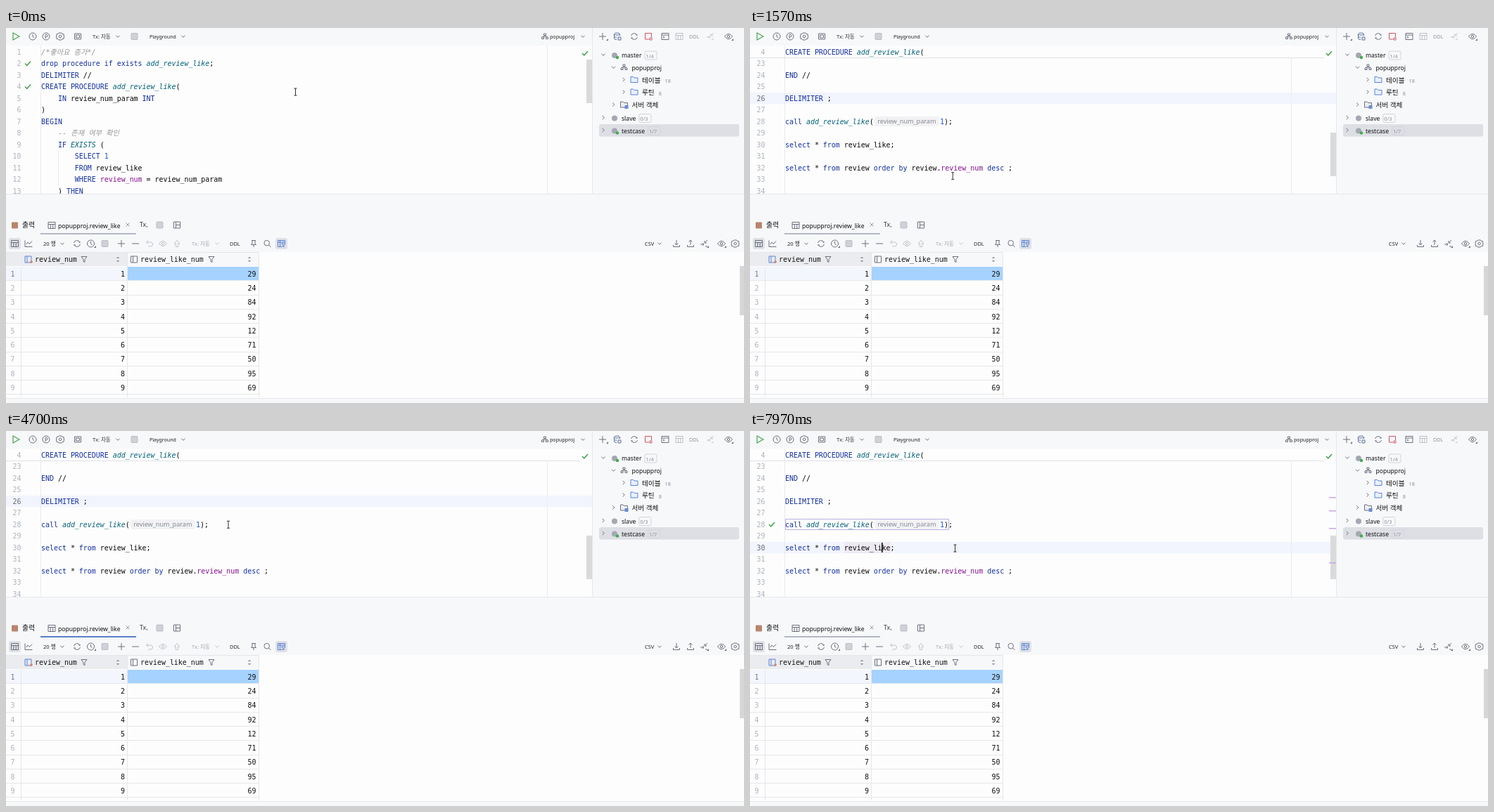
An HTML page with a canvas for the animation above (8 s loop, 1049x534 px).

```html
<!DOCTYPE html>
<html lang="ko">
<head>
<meta charset="utf-8">
<style>
html, body { margin: 0; width: 100%; height: 100%; overflow: hidden; background: #fdfdfd; }
canvas { display: block; }
</style>
</head>
<body>
<canvas id="stage" width="1049" height="534"></canvas>
<script>
const c = document.getElementById('stage').getContext('2d');
const LOOP = 8000, PITCH = 16.5;
const CODE = '9.95px "DejaVu Sans Mono", "Noto Sans CJK KR", monospace';
const NOTE = 'italic 10.2px "DejaVu Sans Mono", "Noto Sans CJK KR", monospace';
const ui = size => size + 'px "Noto Sans", "Noto Sans CJK KR", sans-serif';
const PAPER = '#fdfdfd', PANEL = '#f7f8fa', EDGE = '#e6e7ec', INK = '#6c707e', PALE = '#bfc2cb', DARK = '#111';
const BLUE = '#5b83d6', GREEN = '#4aa653';

// Times of the user's actions
const PANEL_FOCUS = 3000, CLICK_CALL = 4800, POPUP = 5400, RUN = 5900, DONE = 6100, CLICK_SELECT = 6950;

const source = `/*좋아요 증가*/
drop procedure if exists add_review_like;
DELIMITER //
CREATE PROCEDURE add_review_like(
    IN review_num_param INT
)
BEGIN
    -- 존재 여부 확인
    IF EXISTS (
        SELECT 1
        FROM review_like
        WHERE review_num = review_num_param
    ) THEN
        -- 리뷰 번호가 존재하면 좋아요 증가
        UPDATE review_like
        SET review_like_num = review_like_num + 1
        WHERE review_num = review_num_param;
    ELSE
        -- 리뷰 번호가 없으면 새로 추가
        INSERT INTO review_like (review_num, review_like_num)
        VALUES ({review_num}review_num_param, {review_like_num}1);
    END IF;

END //

DELIMITER ;

call add_review_like({review_num_param}1);

select * from review_like;

select * from review order by review.review_num desc ;

`.split('\n');
const keywords = new Set(('drop procedure if exists delimiter create in int begin select from where then update set ' +
  'else insert into values end call order by desc').split(' '));

const icons = {
  play: 'M-4-5L5 0L-4 5Z',
  clock: 'M5 0A5 5 0 1 1-5 0A5 5 0 1 1 5 0M0-3V0L2 2',
  param: 'M5 0A5 5 0 1 1-5 0A5 5 0 1 1 5 0M-1 3V-2.5H.5A1.6 1.6 0 0 1 .5 .8H-1',
  gear: 'M-2-5H2L3-3.5H5L5.5 0L5 3.5H3L2 5H-2L-3 3.5H-5L-5.5 0L-5-3.5H-3ZM1.8 0A1.8 1.8 0 1 1-1.8 0A1.8 1.8 0 1 1 1.8 0',
  frame: 'M-4.5-4H4.5V4H-4.5ZM-2.5-2H2.5V2H-2.5Z',
  layout: 'M-4.5-4.5H4.5V4.5H-4.5ZM-1.5-4.5V4.5M-1.5 0H4.5',
  table: 'M-5-4.5H5V4.5H-5ZM-5-1.5H5M-1.7-1.5V4.5M1.7-1.5V4.5',
  down: 'M-2.6-1.3L0 1.3L2.6-1.3',
  right: 'M-1.3-2.6L1.3 0L-1.3 2.6',
  schema: 'M-1.5-4H1.5V-1.5H-1.5ZM-4.5 1H-1.5V3.5H-4.5ZM1.5 1H4.5V3.5H1.5ZM0-1.5V0M-3 1V0H3V1',
  plus: 'M-5 0H5M0-5V5',
  minus: 'M-5 0H5',
  cross: 'M-2.5-2.5L2.5 2.5M2.5-2.5L-2.5 2.5',
  data: 'M-4.5-3.5A4 1.5 0 1 1 3.5-3.5A4 1.5 0 1 1-4.5-3.5V3A4 1.5 0 0 0-1 4.5M3.5-3.5V-1M-4.5 0A4 1.5 0 0 0-1 1.3M1 1H5V5H1Z',
  refresh: 'M-4.5-1A4.6 4.6 0 0 1 4-2M4.5 1A4.6 4.6 0 0 1-4 2M2-2H5M-5 2H-2',
  stop: 'M1 4H-4.5V-4.5H4.5V1M2 2H5V5H2Z',
  console: 'M-5-4.5H5V4.5H-5ZM-5-2H5M-3 0L-1 1.2L-3 2.5',
  import: 'M5-5L1-1M1-4V-1H4M-5 1H0M-2-1L0 1L-2 3M2 4H5',
  eye: 'M-5.5 0Q0-7.5 5.5 0Q0 7.5-5.5 0M1.7 0A1.7 1.7 0 1 1-1.7 0A1.7 1.7 0 1 1 1.7 0',
  chart: 'M-5-4.5V4.5H5.5M-3 1L-1-2L1.5 .5L5-3.5',
  undo: 'M-2-4.5L-4.5-2L-2 .5M-4.5-2H1.5A3 3 0 0 1 1.5 4H-2',
  up: 'M0-4.5L-4 0H-1.7V4.5H1.7V0H4Z',
  pin: 'M-3-4.5H3M-2-4.5V0L-3.5 1.5H3.5L2 0V-4.5M0 1.5V5',
  search: 'M3-.8A3.8 3.8 0 1 1-4.6-.8A3.8 3.8 0 1 1 3-.8M2 2L5 5',
  filter: 'M-4-4H4L1 0V4L-1 3V0Z',
  gridFilter: 'M1 4.5H-5V-4.5H5V-1M-5-2H5M-2-4.5V4.5M0 0H5.5L3.5 2.5V5L2 4V2.5Z',
  save: 'M-4.5 2V4.5H4.5V2M0-5V2M-2.5-.5L0 2L2.5-.5',
  load: 'M-4.5 2V4.5H4.5V2M0 2V-5M-2.5-2.5L0-5L2.5-2.5',
  folder: 'M-5-4H-1.5L0-2.5H5V4H-5Z',
  column: 'M-4.5-4.5H4.5V4.5H-4.5ZM-1.5-4.5V4.5',
  sort: 'M-1.5-1.5L0-3L1.5-1.5M-1.5 1.5L0 3L1.5 1.5',
  check: 'M-4 0L-1.2 2.8L4-3',
  target: 'M5 0A5 5 0 1 1-5 0A5 5 0 1 1 5 0M0-5V-2M0 5V2M-5 0H-2M5 0H2',
  ibeam: 'M-2-5H2M0-5V5M-2 5H2',
  arrow: 'M0 0V10L2.4 8L4 11.5L5.6 10.7L4 7.4H7Z',
};

function icon(name, x, y, color = INK, width = 1, fill) {
  const path = new Path2D(icons[name]);
  c.save();
  c.translate(x, y);
  if (fill) { c.fillStyle = fill; c.fill(path); }
  c.strokeStyle = color;
  c.lineWidth = width;
  c.stroke(path);
  c.restore();
}
function rect(x, y, w, h, color) {
  c.fillStyle = color;
  c.fillRect(x, y, w, h);
}
function round(x, y, w, h, r, fill, stroke) {
  c.beginPath();
  c.roundRect(x, y, w, h, r);
  if (fill) { c.fillStyle = fill; c.fill(); }
  if (stroke) { c.strokeStyle = stroke; c.lineWidth = 1; c.stroke(); }
}
function disc(x, y, r, color) {
  round(x - r, y - r, 2 * r, 2 * r, r, color);
}
// Draws text centred on y and returns its width
function text(str, x, y, font = ui(8.6), color = DARK, align = 'left') {
  c.font = font;
  c.fillStyle = color;
  c.textAlign = align;
  c.fillText(str, x, y + (font.includes('Mono') ? 3.8 : 3.4));
  return c.measureText(str).width;
}
const corner = (x, y) => { c.beginPath(); c.moveTo(x, y); c.lineTo(x, y - 3); c.lineTo(x - 3, y); c.fillStyle = INK; c.fill(); };

// Values at time t along [time, ...values] points; moves in the plane are eased
function follow(points, t) {
  const i = points.findIndex(p => p[0] > t);
  if (i < 0) return points.at(-1).slice(1);
  if (i === 0) return points[0].slice(1);
  const a = points[i - 1], b = points[i];
  let k = (t - a[0]) / (b[0] - a[0]);
  if (a.length > 2) k = k * k * (3 - 2 * k);
  return a.slice(1).map((v, n) => v + (b[n + 1] - v) * k);
}
const scrollPath = [[130, 0], [250, 30], [370, 71.2], [770, 295.5], [860, 338], [930, 346.5]];
const pointerPath = [[700, 411, 91], [770, 411, 93.5], [1150, 411, 93.5], [2050, 138, 353], [2500, 138, 353],
  [3600, 290, 251], [4150, 290, 251], [4750, 316, 131], [6300, 316, 131], [6900, 188, 167], [7050, 188, 167], [7600, 291, 167]];

function codeLine(n, y) {
  let x = 50;
  for (const [tok, note, hint, num, word] of source[n - 1].matchAll(/(\/\*.*|--.*)|\{(\w+)\}|(\d+)|(\w+)|[^\w{]/g)) {
    if (hint) {
      const font = ui(9.1);
      c.font = font;
      const w = c.measureText(hint).width;
      round(x + 1.5, y - 7, w + 8, 14, 3, '#f2f2f4');
      text(hint, x + 5.5, y - .5, font, '#868a94');
      x += w + 11;
      continue;
    }
    let color = '#080808', font = CODE;
    if (note) [color, font] = ['#969696', NOTE];
    else if (num) color = '#1750eb';
    else if (word === 'add_review_like' || word === 'EXISTS') [color, font] = ['#00627a', 'italic ' + CODE];
    else if (word === 'review_num' || word === 'review_like_num') color = '#871094';
    else if (word && keywords.has(word.toLowerCase())) color = '#12309c';
    x += text(tok, x, y, font, color);
  }
}
const lineNumber = (n, y, active) => text(n, 21.5, y, CODE, active ? '#686c7c' : '#aeb3c2', 'right');

function editor(t) {
  const [scroll] = follow(scrollPath, t);
  const yOf = n => 34 + PITCH * (n - 1) - scroll;
  const current = t < CLICK_CALL ? 26 : t < CLICK_SELECT ? 28 : 30;
  c.save();
  c.beginPath();
  c.rect(0, 25, 833, 211);
  c.clip();
  rect(0, 25, 833, 211, PAPER);
  rect(0, yOf(current) - 8.2, 833, PITCH, '#f2f5fd');
  rect(49, 25, 1, 211, '#e9eaee');
  rect(769, 25, 1, 211, '#ececef');
  for (const [first, count] of [[10, 3], [14, 4], [19, 3]]) rect(74, yOf(first) - 8, 1, PITCH * count, '#e4e5e9');

  const callY = yOf(28);
  if (t >= POPUP && t < RUN) {
    rect(50, callY - 8, 233, 16, '#c9c6f4');
    rect(175, callY - 8, 6, 16, '#9bdcdc');
    rect(277, callY - 8, 6, 16, '#9bdcdc');
  }
  if (t >= RUN) round(50.5, callY - 7.5, 232, 15, 0, null, '#b9b0e4');
  if (t >= CLICK_SELECT) rect(134, yOf(30) - 8, 66, 16, '#eeeaf4');

  source.forEach((_, i) => {
    const n = i + 1, y = yOf(n);
    if (y < 15 || y > 248) return;
    lineNumber(n, y, n === current);
    codeLine(n, y);
    if (n === 2 || n === 4 || (n === 28 && t >= DONE)) icon('check', 31, y, GREEN, 1.6);
  });

  const blinkOn = start => Math.floor((t - start) / 500) % 2 === 0;
  if (t >= CLICK_SELECT) { if (blinkOn(CLICK_SELECT)) rect(187, yOf(30) - 7, 1.5, 14, '#000'); }
  else if (t >= CLICK_CALL && blinkOn(CLICK_CALL)) rect(288, callY - 7, 1.5, 14, '#000');

  if (scroll > 49.5) {
    rect(0, 25, 816, 17, PAPER);
    rect(0, 42, 816, 1, '#dfe1e6');
    rect(49, 25, 1, 17, '#e9eaee');
    lineNumber(4, 34);
    codeLine(4, 34);
  }
  rect(825, 45 + scroll * .3, 8, 62, '#dadada');
  if (t >= CLICK_SELECT) for (const y of [94, 113, 138, 187]) rect(823, y, 10, 1.5, '#c9a4ec');
  else if (t >= CLICK_CALL) rect(823, 177, 10, 1.5, '#8286a8');
  icon('check', 823, 36, GREEN, 1.6);
  c.restore();
}

function topBar() {
  const y = 12;
  icon('play', 14, y, GREEN, 1.2);
  icon('clock', 38, y);
  icon('param', 57, y);
  icon('gear', 77, y);
  icon('frame', 102, y);
  text('Tx: 자동', 123, y, ui(7.5), '#333');
  icon('down', 159, y);
  round(178, 7.5, 9, 9, 1, '#cfd1d7', '#bcbec6');
  text('Playground', 204, y, ui(7), '#222');
  icon('down', 252, y);
  icon('schema', 766, y);
  text('popupproj', 773, y, ui(7.1), '#222');
  icon('down', 820, y);
  icon('plus', 848, y);
  corner(856, 18);
  icon('data', 869, y, '#59709f');
  icon('refresh', 893, y);
  icon('stop', 913, y, '#cc5560');
  icon('console', 937, y);
  icon('table', 957, y, PALE);
  text('DDL', 971, y, ui(7.2), '#8d919c');
  icon('import', 1001, y, PALE);
  icon('eye', 1027, y);
  corner(1034, 18);
}

function tree() {
  round(843, 137, 199, 17.5, 3, '#dddfe5');
  const rows = [
    ['master', 0, 39, 'down', '1/4'], ['popupproj', 1, 57, 'down'], ['테이블', 2, 74.5, 'right', '18'],
    ['루틴', 2, 92, 'right', '8'], ['서버 객체', 1, 110, 'right'],
    ['slave', 0, 128.5, 'right', '0/3'], ['testcase', 0, 146.5, 'right', '1/7'],
  ];
  for (const [name, depth, y, chevron, count] of rows) {
    const x = 875 + depth * 14.5;
    icon(chevron, x - 26, y - 1);
    if (!depth) {
      disc(x - 10, y, 4, '#a4a8b2');
      if (name !== 'slave') disc(x - 6, y + 3, 2.2, '#3fae49');
    } else if (name === 'popupproj') icon('schema', x - 11, y - 1);
    else icon('folder', x - 11, y - 1, depth === 1 ? INK : BLUE, 1, depth === 1 ? '#eceef2' : '#e9f0ff');
    if (name === '서버 객체') rect(x - 10, y, 5, 5, '#6a8bd0');
    const size = /[a-z]/.test(name) ? 8.6 : 9.6;
    const end = x + text(name, x, y, ui(size), '#111');
    if (!count) continue;
    if (!depth) round(end + 4.5, y - 6, 17, 12, 2, null, '#d3d5dc');
    text(count, end + 6, y + .5, ui(7.4), '#8c909c');
  }
}

function resultBars(t) {
  if (follow(pointerPath, t)[1] > 237) {
    icon('target', 997, 252);
    for (const dy of [-4, 0, 4]) disc(1016, 252 + dy, .9, INK);
    icon('minus', 1036, 252);
  }
  let y = 281;
  round(8, 276.5, 9, 9, 1, '#b8856d');
  text('출력', 23, y, ui(9.8));
  icon('table', 65, y);
  text('popupproj.review_like', 74, y + .5);
  icon('cross', 173, y - 1, '#9599a5');
  text('Tx,', 190, y - 1, ui(8.6), '#333');
  round(214, 276, 9, 9, 1, '#cfd1d7', '#bcbec6');
  icon('layout', 243, y - .5);
  const focused = t >= PANEL_FOCUS && t < CLICK_CALL;
  rect(49, 292, 136, 2, focused ? '#5b7fc7' : '#b4b8c6');

  y = 307;
  round(4, 299, 17, 16, 3, '#dfe1e6');
  round(383, 299, 17, 16, 3, '#dfe1e6');
  icon('table', 12.5, y);
  icon('chart', 32, y);
  text('20 행', 53, y, ui(7.6), '#222');
  icon('down', 80, y);
  icon('refresh', 101, y);
  icon('clock', 120.5, y);
  corner(128, 313);
  round(136, 302.5, 9, 9, 1, '#cfd1d7', '#bcbec6');
  icon('plus', 164, y);
  icon('minus', 184, y);
  icon('undo', 204, y, PALE);
  icon('eye', 223, y, PALE);
  icon('up', 243, y, PALE);
  text('Tx: 자동', 264, y, ui(7.5), '#a5a8b2');
  icon('down', 300, y, PALE);
  text('DDL', 318, y, ui(7.4), '#222');
  icon('pin', 352, y);
  icon('search', 371.5, y);
  icon('gridFilter', 391.5, y, BLUE);
  text('CSV', 908, y, ui(7.4), '#222');
  icon('down', 929, y);
  icon('save', 953, y);
  icon('load', 973, y);
  icon('import', 992, y);
  corner(999, 313);
  icon('eye', 1017, y);
  corner(1024, 313);
  icon('gear', 1036.5, y);
}

function grid() {
  const likes = [29, 24, 84, 92, 12, 71, 50, 95, 69], step = 20.25, top = 339.5;
  rect(0, 319, 1049, 208, PAPER);
  rect(0, 319, 360, 20, PANEL);
  rect(0, 319, 172, 20, '#ebecef');
  rect(0, 340, 172, 19, '#f3f6fd');
  rect(173, 340, 186, 19, '#a6d2ff');
  for (const x of [172, 359]) rect(x, 319, 1, 207, EDGE);
  rect(21, top, 1, 186, EDGE);
  icon('column', 31.5, 329.5, BLUE);
  disc(36, 333, 1.8, '#d9815a');
  icon('column', 182, 329.5);
  text('review_num', 41, 329.5, CODE);
  text('review_like_num', 191, 329.5, CODE);
  for (const x of [111, 292]) icon('filter', x, 329.5);
  for (const x of [159, 346]) icon('sort', x, 329.5, '#444');
  likes.forEach((value, i) => {
    const y = 350 + i * step;
    rect(0, Math.floor(top + (i + 1) * step), 360, 1, EDGE);
    text(i + 1, 9.5, y, CODE, i ? '#aeb3c2' : '#767a8a', 'center');
    text(i + 1, 169, y, CODE, DARK, 'right');
    text(value, 355.5, y, CODE, DARK, 'right');
  });
  rect(0, 319, 360, 1, EDGE);
  rect(1043, 339, 6, 70, '#d6d6d6');
  rect(0, 527, 1049, 7, PANEL);
  rect(0, 527, 1049, 1, EDGE);
}

function popup() {
  c.save();
  c.shadowColor = 'rgba(0,0,0,.22)';
  c.shadowBlur = 34;
  c.shadowOffsetY = 14;
  round(270.5, 141.5, 252, 84, 6, '#fff');
  c.restore();
  round(270.5, 141.5, 252, 84, 6, '#fff', '#b4b8c4');
  round(271, 212, 251, 13, [0, 0, 5, 5], '#f3f4f7');
  text('구문', 398, 157, 'bold ' + ui(9.6), DARK, 'center');
  round(276.5, 171, 240.5, 17, 3, '#d2dffb');
  text('call add_review_like(1)', 282, 180, ui(8.8));
  text('/*좋아요 증가*/ drop procedure if exists add_review_lik...', 282, 198, ui(8.9));
  text('사용자 지정', 273, 219, ui(10.3), '#566a9c');
}

function pointer(t) {
  const [x, y] = follow(pointerPath, t);
  if (y < 236) icon('ibeam', x + .5, y, '#333');
  else icon('arrow', x, y, '#333', 1, '#fff');
}

function draw(now) {
  const t = now % LOOP;
  rect(0, 0, 1049, 534, PANEL);
  topBar();
  editor(t);
  rect(833, 0, 1, 236, EDGE);
  rect(0, 236, 1049, 1, EDGE);
  tree();
  resultBars(t);
  grid();
  if (t >= POPUP && t < RUN) popup();
  pointer(t);
  requestAnimationFrame(draw);
}
requestAnimationFrame(draw);
</script>
</body>
</html>
```
